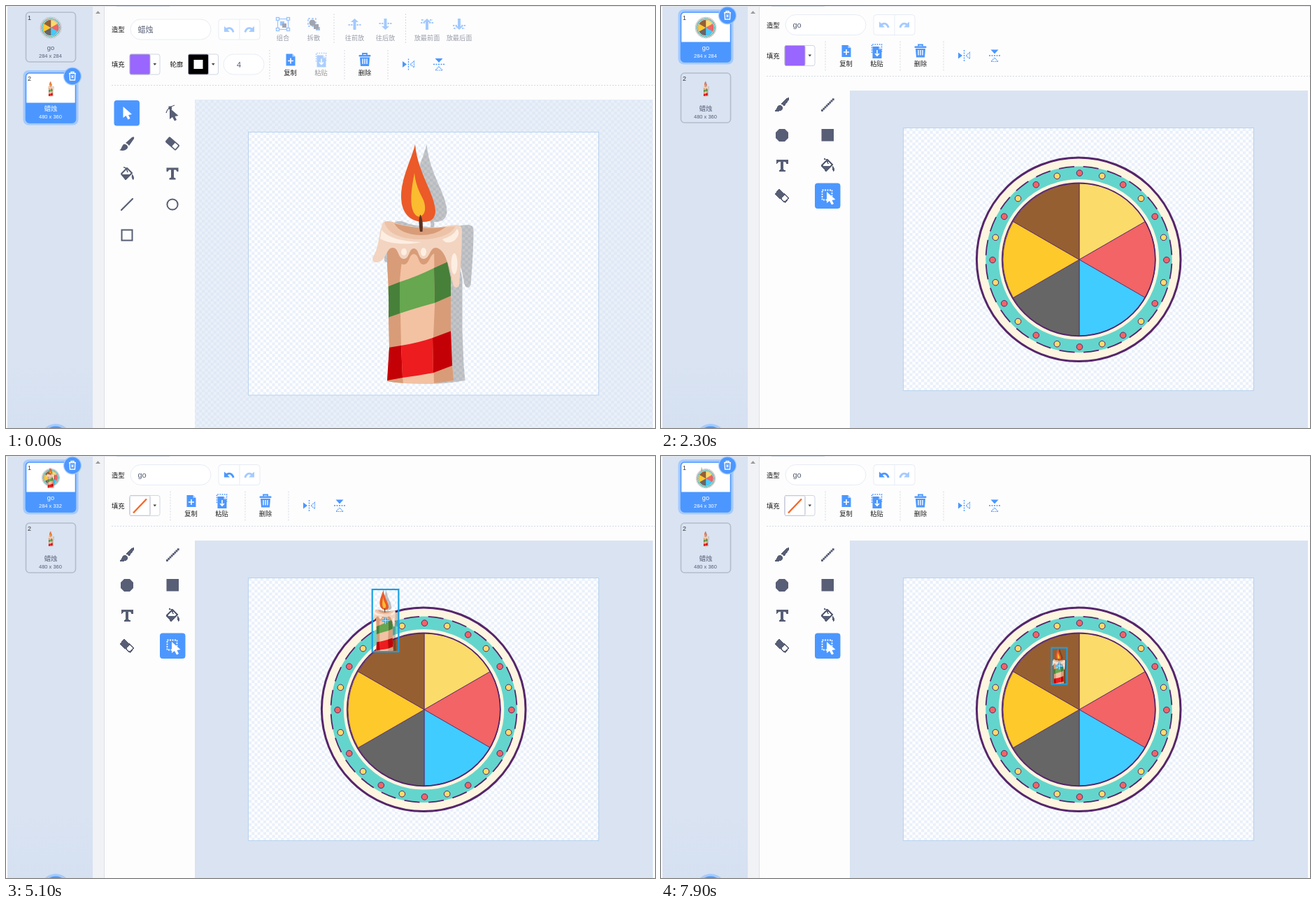
Recreate the animation shown at these times as an HTML page. Size 928x604 px, loop 8000 ms.

```html
<!DOCTYPE html>
<html lang="zh">
<head>
<meta charset="utf-8">
<title>Costume editor</title>
<style>
html, body { margin: 0; width: 100%; height: 100%; overflow: hidden; background: #fdfdfd; }
svg { display: block; width: 928px; height: 604px; }
text { font-family: "Liberation Sans", "Noto Sans CJK SC", "Noto Sans CJK", sans-serif; }
</style>
</head>
<body>
<svg id="stage" viewBox="0 0 928 604" xmlns="http://www.w3.org/2000/svg"></svg>
<script>
const BLUE = '#4c97ff', INK = '#575e75', PALE = '#d9e3f2', PURPLE = '#56256b', SELECT = '#18a0e4';
const BOX_W = 146, BOX_H = 345, LOOP = 8000;

// ---- small builders ----
const at = (x, y, body, extra = '') => `<g transform="translate(${x} ${y})" ${extra}>${body}</g>`;
const path = (d, fill = INK, extra = '') => `<path d="${d}" fill="${fill}" ${extra}/>`;
const line = (d, color, w = 1, extra = '') => path(d, 'none', `stroke="${color}" stroke-width="${w}" ${extra}`);
const rect = (x, y, w, h, fill, extra = '') =>
  `<rect x="${x}" y="${y}" width="${w}" height="${h}" fill="${fill}" ${extra}/>`;
const circle = (x, y, r, fill, extra = '') => `<circle cx="${x}" cy="${y}" r="${r}" fill="${fill}" ${extra}/>`;
const text = (x, y, s, size, fill, extra = '') =>
  `<text x="${x}" y="${y}" font-size="${size}" fill="${fill}" ${extra}>${s}</text>`;
const mid = (x, y, s, size, fill, extra = '') => text(x, y, s, size, fill, 'text-anchor="middle" ' + extra);
const dashes = d => line(d, '#d3d9e3', 1, 'stroke-dasharray="2 2"');
const pill = (x, y, w, r) => rect(x, y, w, 29, '#fff', `rx="${r}" stroke="#e6ecf5"`);

function checker(id, y, base, tint) {
  const c = 4.18;
  return `<pattern id="${id}" x="347" y="${y}" width="${2 * c}" height="${2 * c}" patternUnits="userSpaceOnUse">` +
    rect(0, 0, 2 * c, 2 * c, base) + rect(0, 0, c, c, tint) + rect(c, c, c, c, tint) + '</pattern>';
}

// ---- artwork ----
const flame = 'M585 198C580 219 565 246 565 272C565 294 575 307 594 309C608 310 614 304 614 293C612 266 589 240 585 198Z';
const wick = 'M592 299Q589 308 592 323L595.5 323Q597 308 593 299Z';
const wax = 'M539 310C546 305 553 309 560 312C585 318 612 318 630 315C644 312 652 312 652 321C652 347 650 375 648 399' +
  'C646 405 641 404 639 398C636 384 635 374 630 364C627 354 621 346 614 346C606 346 606 362 597 362' +
  'C589 362 591 347 583 347C576 347 577 362 569 362C560 362 562 346 553 346C543 346 544 366 530 367' +
  'C523 367 523 361 526 357C534 343 533 322 539 310Z';
const body = 'M545 335L545 370Q548 410 547 446L548 489L545 537Q592 545 640 536L638 514L636 465L636 414L636 390L630 362L632 335Z';

function candleArt() {
  const shade = '#d89c78', glow = '#fdeee2';
  return `<clipPath id="bodyClip">${path(body)}</clipPath>` +
    `<g opacity=".22" transform="translate(16.5 0)">${[flame, wick, wax, body].map(d => path(d, '#000')).join('')}</g>` +
    path(body, '#f2c2a3') +
    '<g clip-path="url(#bodyClip)">' +
    path('M540 335H568L566 365Q560 410 564 440L565 487L568 545H540Z', shade) +
    path('M612 335H645V545H612L611 475L613 430Z', shade) +
    path(wax, shade, 'transform="translate(0 8)"') +
    path('M540 404L563 395V440L540 448Z', '#478039') +
    path('M563 395Q588 387 612 375L613 425Q590 431 563 440Z', '#66a74f') +
    path('M612 375L645 360V411L613 425Z', '#478039') +
    path('M540 490L565 486L567 532L540 537Z', '#c40007') +
    path('M565 486Q590 482 610 475L611 525Q590 529 567 532Z', '#ed1c1f') +
    path('M610 475L645 462V512L611 525Z', '#c40007') + '</g>' +
    path(wax, '#f3d4c0') +
    path('M541 309C551 306 560 313 580 316C605 319 630 317 643 315C636 329 612 335 589 334C563 333 545 325 541 309Z', '#edc3a8') +
    path('M555 311C575 317 608 320 629 316C618 325 606 328 592 328C574 327 561 322 555 311Z', shade) +
    path('M537 320C545 332 567 337 594 338C574 342 548 341 535 333Z', glow) +
    path('M624 334Q640 329 645 319Q651 326 641 336Q630 342 624 334Z', glow) +
    '<g fill="' + glow + '"><ellipse cx="569" cy="352" rx="4" ry="5"/><ellipse cx="597" cy="352" rx="4" ry="6"/>' +
    '<ellipse cx="641" cy="369" rx="4.5" ry="15"/></g>' +
    path(flame, '#eb5a28') +
    path('M584 239C581 255 578 272 580 286C582 298 588 303 593 301C601 297 600 286 597 278C591 266 586 257 584 239Z', '#fbbc30') +
    path(wick, '#5b3120');
}

function wheelArt() {
  const colors = ['#fbdb6a', '#f26465', '#40ccff', '#666', '#fdc92b', '#965f32'];
  const polar = (r, deg) => {
    const a = (deg - 90) * Math.PI / 180;
    return [(r * Math.cos(a)).toFixed(2), (r * Math.sin(a)).toFixed(2)];
  };
  let out = circle(597.2, 362.8, 145.8, '#fdf5e0', `stroke="${PURPLE}" stroke-width="3"`) +
    circle(597.5, 362.8, 124, 'none', 'stroke="#64d5cc" stroke-width="18.5"') +
    circle(597.5, 362.8, 133, 'none', `stroke="${PURPLE}" stroke-width="1.8" stroke-dasharray="22 12.82" stroke-dashoffset="-6"`);
  const slices = colors.map((c, i) =>
    path(`M0 0L${polar(109, i * 60)}A109 109 0 0 1 ${polar(109, i * 60 + 60)}Z`, c, `stroke="${PURPLE}" stroke-width=".8"`));
  out += at(598, 363, slices.join('')) +
    circle(597.3, 362.8, 109.5, 'none', `stroke="${PURPLE}" stroke-width="1.8"`);
  for (let i = 0; i < 24; i++) {
    const [x, y] = polar(124.4, i * 15);
    out += at(598.5, 363.5, circle(x, y, 4.3, i % 2 ? '#fbdb6a' : '#f26465', `stroke="${PURPLE}"`));
  }
  return out;
}

const candle = (x, y, s) =>
  `<use href="#candle" transform="translate(${x} ${y}) scale(${s}) translate(-523.5 -196.5)"/>`;

// ---- icons, centred on 0,0 ----
const arrow = 'M-5.5 -9V7L-1.5 4L1.5 9.5L4.5 8L2 3L7 2Z';
const icons = {
  brush: path('M-11 9C-8 9 -8 4 -5 1C-2 0 2 3 1 6C-1 10 -7 11 -11 9Z') + path('M-2 -1L7 -9Q11 -11 10 -7L3 3Q1 0 -2 -1Z'),
  eraser: `<g transform="rotate(41)">${rect(-10, -5, 20, 10, INK, 'rx="2"')}${rect(2, -3.4, 6.2, 6.8, '#fff', 'rx="1"')}</g>`,
  bucket: line('M-8 0L0 -8L7 -1L-2 8Z', INK, 2, 'stroke-linejoin="round"') + path('M-9 1H6L-2 9Z') +
    line('M-5 -9Q-1 -10 1 -2', INK, 1.5) + path('M7 0Q12 6 9 9Q6 8 7 0Z'),
  type: path('M-8.5 -8.5H8.5V-3H6.5L5 -5.5H2V5.5L4.5 6.5V8.5H-4.5V6.5L-2 5.5V-5.5H-5L-6.5 -3H-8.5Z'),
  reshape: at(1.5, 3, path(arrow)) + line('M-9 1Q-7 -7 3 -10', INK, 1.3) + rect(-5.5, -8.5, 4.5, 4.5, INK),
  trash: line('M-3 -7V-9H3V-7', BLUE, 1.8) + rect(-8.5, -7, 17, 2.6, BLUE, 'rx="1"') + path('M-7 -3.6H7L6 9H-6Z', BLUE) +
    line('M-3 -1.5V6M0 -1.5V6M3 -1.5V6', '#fff', 1.4),
};
const doc = sign => path('M-6 -8H3L7 -4V9H-6Z', BLUE) + path('M3 -8V-4H7Z', '#bcd6ff') + line(sign, '#fff', 1.6);
const copyIcon = doc('M.5 -2V6M-3.5 2H4.5');
const pasteIcon = line('M-7 3V-9H7V3', BLUE, 1.6, 'stroke-dasharray="1.6 1.6"') + at(0, 2, doc('M.5 -3V5M-2.5 2L.5 5L3.5 2'));
const turn = path('M312 29v8h8l-3-3q4-3 7 4l2.5-1q-3-9.500-11.500-5.500z', BLUE);

function layerIcon(flip, far) {
  const rows = far ? 'M-9 -2H-3M3 -2H9M-8 -6H-4M4 -6H8' : 'M-9 1H-3M3 1H9';
  return `<g transform="scale(1 ${flip})" opacity=".5">` + path('M0 -8L5.500 -3H2V8H-2V-3H-5.500Z', BLUE) +
    line(rows, BLUE, 1.8, 'stroke-dasharray="2.4 1.2"') + '</g>';
}

function groupIcon() {
  const corners = [-7.5, 7.5].flatMap(x => [-7.5, 7.5].map(y => rect(x - 2, y - 2, 4, 4, '#fff', `stroke="${BLUE}" stroke-width="1.4"`)));
  return rect(-7.5, -7.5, 15, 15, 'none', `stroke="${BLUE}" stroke-width="1.2"`) + corners.join('') +
    rect(-4, -4, 6, 6, BLUE) + rect(-1, -1, 6, 6, INK);
}
const ungroupIcon = line('M-8 -8H3V3H-8Z', BLUE, 1.4, 'stroke-dasharray="3 2"') + circle(-2, -2, 4.5, INK) +
  rect(0, 0, 7, 7, INK) + line('M8 4V8H3', BLUE, 2);

// ---- toolbar ----
function nameRow(name, group) {
  return text(151, 37, '造型', 9.3, '#111', 'font-weight="500"') + pill(178, 19, 115, 14.5) + text(188.5, 37.5, name, 11, INK) +
    pill(304, 19, 59, 4) + line('M334 19V48', '#e6ecf5') +
    `<g class="${group}" opacity=".5">${turn}</g><g transform="translate(667 0) scale(-1 1)" opacity=".5">${turn}</g>`;
}

function swatch(x, fill) {
  return rect(x, 69, 43, 29, '#fff', 'rx="3" stroke="#cfd6e2"') + rect(x, 69, 29, 29, fill, 'rx="2" stroke="#b9b9c9"') +
    path(`M${x + 33.5} 82h4.600l-2.300 3z`, '#444');
}

function editRow(prefix) {
  const hit = (id, x) => rect(x, 63.5, 41, 41, '#dbe9ff', `id="${prefix}${id}Press" rx="4" visibility="hidden"`);
  return ['377', '484', '546'].map(x => dashes(`M${x} 63V105`)).join('') + hit('copy', 386) + hit('paste', 430) +
    at(406.5, 76.5, copyIcon) + mid(406.5, 98.500, '复制', 9.3, '#222') +
    `<g id="${prefix}paste">${at(450.5, 76.5, pasteIcon)}${mid(450.5, 98.500, '粘贴', 9.3, '#222')}</g>` +
    at(513, 77, icons.trash) + mid(513, 98.500, '删除', 9.3, '#222') +
    path('M567 79L573 83.500L567 88Z', BLUE) + line('M575.500 75.500V92', BLUE, 1.3, 'stroke-dasharray="2 1.5"') +
    line('M583.500 79L578 83.500L583.500 88Z', BLUE, 1.2, 'stroke-dasharray="1.5 1"') +
    path('M613.500 75H624.500L619 81Z', BLUE) + line('M611 83.500H627', BLUE, 1.3, 'stroke-dasharray="2 1.5"') +
    line('M614 92H624L619 86.500Z', BLUE, 1.2, 'stroke-dasharray="1.5 1"');
}

function vectorView() {
  const tops = [[396, '组合', groupIcon()], [440, '拆散', ungroupIcon], [498.5, '往前放', layerIcon(1)],
    [542.5, '往后放', layerIcon(-1)], [602, '放最前面', layerIcon(1, true)], [648, '放最后面', layerIcon(-1, true)]];
  const tools = [['reshape', 238, 152], ['brush', 173, 197], ['eraser', 238, 197], ['bucket', 173, 240], ['type', 238, 240]];
  return nameRow('蜡烛', 'undoOff') +
    tops.map(([x, label, art], i) => at(x, 26, art, i < 2 ? 'opacity=".55"' : '') + mid(x, 48.5, label, 9.2, '#999daa')).join('') +
    dashes('M469 11V55') + dashes('M571.5 11V55') +
    text(151, 87, '填充', 9.3, '#111', 'font-weight="500"') + swatch(177, '#9966ff') +
    text(234.5, 87, '轮廓', 9.3, '#111', 'font-weight="500"') + swatch(260.5, '#000') + rect(268.5, 77, 13, 13, '#fff') +
    pill(311, 69, 58, 14.5) + mid(333, 87.5, '4', 11, INK) +
    editRow('v') + dashes('M151 113.5H928') +
    rect(154.5, 135, 36.5, 36.5, BLUE, 'rx="4"') + at(173, 153, path(arrow, '#fff')) +
    tools.map(([id, x, y]) => at(x, y, icons[id])).join('') +
    line('M165 292L181 276', INK, 2.2, 'stroke-linecap="round"') + circle(238, 284, 7.6, 'none', `stroke="${INK}" stroke-width="2"`) +
    rect(165.500, 320.500, 15, 15, 'none', `stroke="${INK}" stroke-width="2"`) +
    rect(270, 134, 655, 470, 'url(#outer)') +
    rect(346.5, 180.500, 501, 376.5, 'url(#paperV)', 'stroke="#b9d2ee"') + candle(523.5, 196.5, 1);
}

function bitmapView() {
  const tools = [['brush', 173, 141], ['type', 173, 228.5], ['bucket', 238, 228], ['eraser', 173, 272]];
  let steps = '';
  for (let i = 0; i < 8; i++) steps += rect(229 + i * 2.25, 148 - i * 2.25, 2.9, 2.9, INK);
  return at(0, -6.5, nameRow('go', 'undo')) +
    at(0, -12.5, text(151, 87, '填充', 9.3, '#111', 'font-weight="500"') + swatch(177, '#9966ff') +
      `<g id="noFill">${rect(177.500, 69.500, 28, 28, '#fff', 'stroke="#d5dae4"')}${line('M182 94L201 74', '#f5692b', 2.4)}</g>`) +
    at(-142, -12.5, editRow('b')) + dashes('M151 100.5H928') +
    tools.map(([id, x, y]) => at(x, y, icons[id], 'shape-rendering="crispEdges"')).join('') + steps +
    path('M169 176h8l5 5v8l-5 5h-8l-5-5v-8z') + rect(229.5, 176, 17.500, 17.500, INK) +
    rect(220, 253.5, 36.5, 36.5, BLUE, 'rx="4"') +
    rect(230.5, 263.5, 14, 14, 'none', 'stroke="#fff" stroke-width="1.8" stroke-dasharray="2 1.5"') + at(242.500, 275, path(arrow, '#fff')) +
    rect(270, 121, 655, 483, PALE) + rect(346.5, 174.5, 501, 376, 'url(#paperB)', 'stroke="#b9d2ee"') +
    '<use href="#wheel"/><g id="pasted"></g>';
}

// ---- costume list ----
function item(y, no, name, size, thumb, mode) {
  const on = mode === 'on', ink = on ? '#fff' : INK;
  const edge = mode === 'off' ? '#b4bdcc' : BLUE;
  let out = on ? rect(24.5, -3.5, 79, 78.5, '#a5cafc', 'rx="8"') : '';
  out += rect(28.5, .5, 71, 71, on ? '#fff' : mode === 'hover' ? '#f7faff' : PALE, `rx="5" stroke="${edge}" stroke-width="1.6"`);
  if (on) out += path('M28 43H100V66Q100 72 94 72H34Q28 72 28 66Z', BLUE);
  out += text(31, 11, no, 9, '#333') + mid(64, 54.500, name, 9.3, ink) + mid(63.5, 65, size, 7.5, ink) + thumb;
  if (on) out += circle(95, 5, 13, '#a5cafc') + circle(95, 5, 11.8, BLUE) +
    line('M90 1H100M93 1V-1H97V1M91 1L91.500 10.500H98.500L99 1M93.500 4L96.500 7.500M96.500 4L93.500 7.500', '#fff', 1.3);
  return at(0, y, out);
}

function wheelThumb(top, bottom, inner) {
  const s = 30 / (bottom - top);
  return `<g transform="translate(64 22.5) scale(${s}) translate(-597 ${-(top + bottom) / 2})"><use href="#wheel"/>${inner}</g>`;
}

function costumes(t) {
  const onGo = t >= 2300;
  let size = '284 x 284', thumb = wheelThumb(216, 510, '');
  if (t >= 7000) { size = '284 x 307'; thumb = wheelThumb(191, 510, candle(523.5, 191, scaleAt(7000))); }
  else if (t >= 3600) { size = '284 x 332'; thumb = wheelThumb(191, 536, candle(523.5, 191, 1)); }
  return item(8.5, '1', 'go', size, thumb, onGo ? 'on' : t >= 2000 ? 'hover' : 'off') +
    item(95.5, '2', '蜡烛', '480 x 360', candle(59.5, 12, .063), onGo ? 'off' : 'on');
}

// ---- motion ----
const drag = [[4400, 1], [4700, .72], [5100, .258], [5300, .258], [5400, .243], [5600, .243],
  [6100, .165], [6200, .165], [6400, .151]];

function scaleAt(t) {
  if (t <= drag[0][0]) return 1;
  for (let i = 1; i < drag.length; i++) {
    const [t0, s0] = drag[i - 1], [t1, s1] = drag[i];
    if (t <= t1) return s0 + (s1 - s0) * (t - t0) / (t1 - t0);
  }
  return drag[drag.length - 1][1];
}

function selection(t) {
  const s = scaleAt(t), k = Math.min(1, Math.max(0, (t - 7500) / 400));
  const x = 523.7 + 34.8 * k, y = 191 + 83.5 * k, w = BOX_W * s, h = BOX_H * s, cx = x + w / 2, cy = y + h / 2;
  const plus = `M${cx - 5} ${cy}h10M${cx} ${cy - 5}v10`;
  let out = candle(x, y, s) + rect(x, y, w, h, 'none', `stroke="${SELECT}" stroke-width="2.2"`) +
    line(plus, SELECT, 3) + line(plus, '#d5e6ef', 1);
  if (t < 4500 || (t >= 6900 && t < 7600)) {
    for (const i of [0, .5, 1]) for (const j of [0, .5, 1])
      if (i !== .5 || j !== .5) out += circle(x + w * i, y + h * j, 4, SELECT);
    out += at(cx, y + h, line('M0 0V15', SELECT, 2) + line('M-6 15Q0 20.500 6 15', SELECT, 3) +
      path('M-9 13H-3L-9 19ZM9 13H3L9 19Z', SELECT));
  }
  return out;
}

// ---- page ----
const stage = document.getElementById('stage');
stage.innerHTML = '<defs>' + checker('outer', 180.5, '#e9f0f9', '#dfe8f5') + checker('paperV', 180.5, '#fff', '#e9f0fa') +
  checker('paperB', 174.5, '#fff', '#e9f0fa') +
  '<linearGradient id="fade" x2="0" y2="1"><stop offset=".85" stop-color="#d9e3f2"/><stop offset="1" stop-color="#d5e0f1"/></linearGradient>' +
  `<g id="candle">${candleArt()}</g><g id="wheel">${wheelArt()}</g></defs>` +
  rect(0, 0, 928, 604, '#fdfdfd') + rect(2, 0, 122, 604, 'url(#fade)') + rect(124, 0, 16, 604, '#f1f2f5') +
  path('M128 11L131.500 7L135 11Z', '#9a9a9a') + line('M140.5 0V604', '#dcdfe6') + line('M0 .5H928', '#e4e6ea') +
  line('M158 .5H234', '#cdd2dc') + '<g id="list"></g>' +
  circle(71, 620, 22, '#a5cafc') + circle(71, 620, 18.5, BLUE) +
  `<g id="vector">${vectorView()}</g><g id="bitmap">${bitmapView()}</g>`;

const el = id => document.getElementById(id);
const show = (id, on) => el(id).setAttribute('visibility', on ? 'visible' : 'hidden');
const undo = stage.querySelector('.undo');
let last = -1;

function render(t) {
  if (t === last) return;
  last = t;
  const pasted = t >= 3500;
  el('vector').style.display = t < 2300 ? '' : 'none';
  el('bitmap').style.display = t < 2300 ? 'none' : '';
  el('list').innerHTML = costumes(t);
  el('pasted').innerHTML = pasted ? selection(t) : '';
  el('vpaste').setAttribute('opacity', t < 1600 ? .45 : 1);
  show('vcopyPress', t === 1500);
  show('bpastePress', t >= 3200 && !pasted);
  show('noFill', pasted);
  undo.setAttribute('opacity', pasted ? 1 : .5);
}

const start = performance.now();
function tick() {
  render(Math.floor((performance.now() - start) % LOOP / 100) * 100);
  requestAnimationFrame(tick);
}
tick();
</script>
</body>
</html>
```
